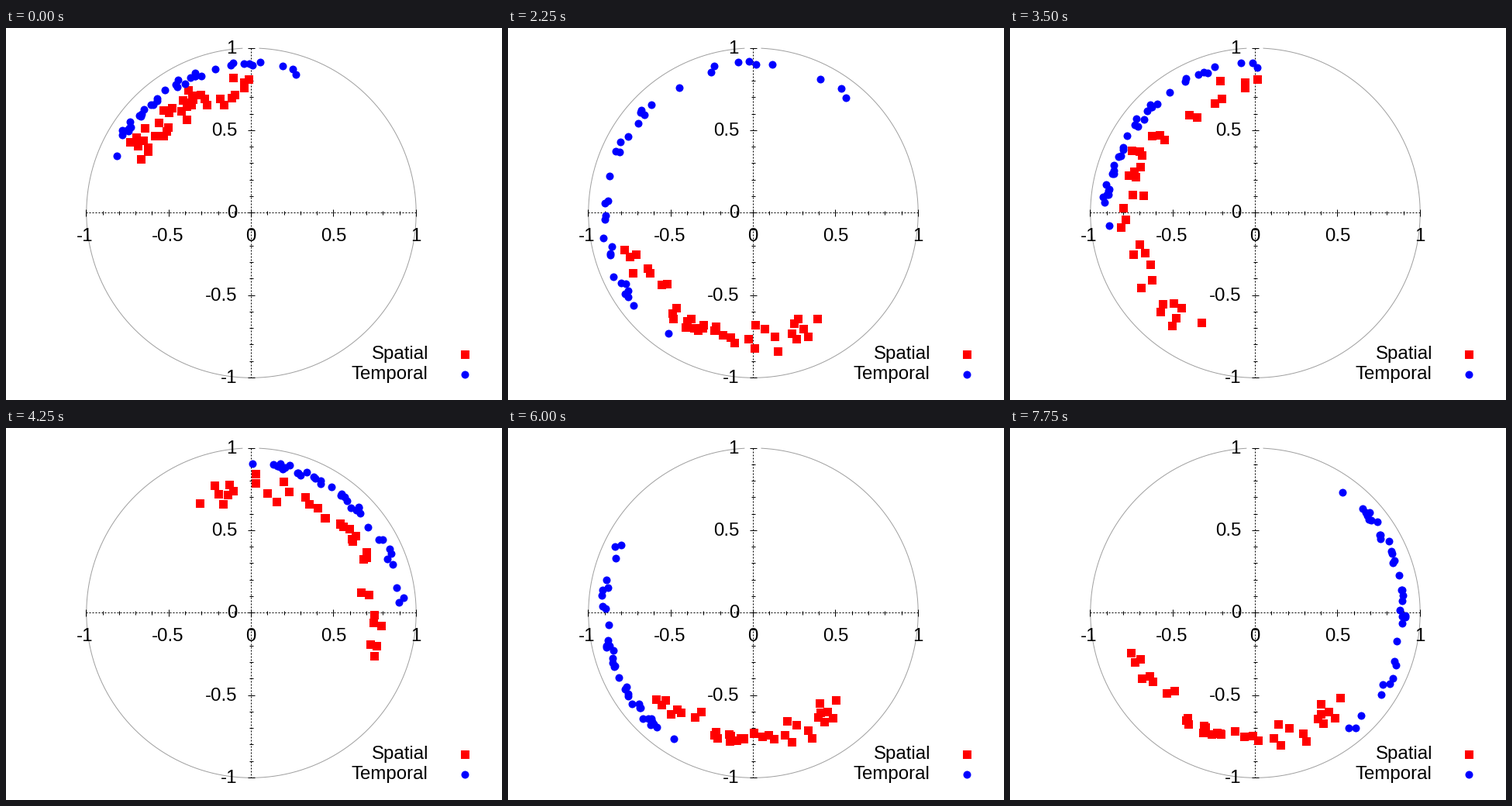
Write a matplotlib script that moves like this. It is 640 px wide and 480 px high and loops after 8000 ms.

```python
import numpy as np
import matplotlib.pyplot as plt
from matplotlib.animation import FuncAnimation

W, H, DPI = 640, 480, 100
PX = 72 / DPI                       # one pixel in points
CX, CY, R = 316.1, 238.3, 212.7
FRAMES, STEP_MS = 32, 250
COUNT = 36

# Each swarm is an arc that turns and stretches: its first and last angle
# (degrees, unwrapped) at a few key steps.
KEY_STEPS = [0, 4, 9, 14, 20, 27, 31]
SPATIAL_HEAD = [154, 152, -59, -116, -374, -431, -405]
SPATIAL_TAIL = [91, 19, -164, -271, -488, -506, -522]
TEMPORAL_HEAD = [157, 298, 235, -175, -366, -569, -666]
TEMPORAL_TAIL = [72, 216, 51, -271, -441, -662, -771]


class Swarm:
    def __init__(self, head, tail, r_min, r_max, wobble, seed):
        rng = np.random.default_rng(seed)
        self.head, self.tail = head, tail
        place = rng.beta(1.5, 1.5, COUNT)
        self.place = (place - place.min()) / np.ptp(place)
        self.radius = rng.uniform(r_min, r_max, COUNT)
        self.phase = rng.uniform(0, 2 * np.pi, COUNT)
        self.wobble = wobble

    def at(self, step):
        head = np.interp(step, KEY_STEPS, self.head)
        tail = np.interp(step, KEY_STEPS, self.tail)
        angle = np.radians(head + (tail - head) * self.place)
        r = R * (self.radius + self.wobble * np.sin(self.phase + 0.9 * step))
        return CX + r * np.cos(angle), CY - r * np.sin(angle)


plt.rcParams["font.family"] = "Liberation Sans"
fig = plt.figure(figsize=(W / DPI, H / DPI), dpi=DPI, facecolor="white")
ax = fig.add_axes([0, 0, 1, 1])
ax.set_xlim(0, W)
ax.set_ylim(H, 0)
ax.axis("off")


def line(x, y, color="black", **kw):
    ax.plot(x, y, color=color, lw=PX, solid_capstyle="butt",
            dash_capstyle="butt", zorder=1, **kw)


def label(x, y, text, ha):
    ax.text(x, y, text, ha=ha, va="baseline", size=24 * PX, zorder=2)


def markers(x, y, shape, color, size, z):
    return ax.plot(x, y, shape, color=color, ms=size * PX, mew=0, zorder=z)[0]


# Unit circle, open for a few pixels at the top
arc = np.radians(np.linspace(93, 447.3, 721))
line(CX + 0.4 + R * np.cos(arc), CY + 0.3 - R * np.sin(arc), "#a0a0a0")

# Axes with minor and major ticks
line([CX - R, CX + R], [CY, CY], dashes=(2, 2))
line([CX, CX], [CY - R, CY + R], dashes=(2, 2))
for i in range(-10, 11):
    half = 4.5 if i % 5 == 0 else 2.5
    x, y = CX + R * i / 10, CY - R * i / 10
    line([x, x], [CY - half, CY + half])
    line([CX - half, CX + half], [y, y])
    if i % 5 == 0:
        text = f"{i / 10:g}"
        label(x - (1.5 if i < 0 else 0), 275, text, "center")
        label(298, y + 7, text, "right")

# Legend
label(545, 427.5, "Spatial", "right")
label(544.5, 453.5, "Temporal", "right")
markers([592], [421], "s", "red", 11, 3)
markers([592], [447], "o", "blue", 10, 4)

swarms = [Swarm(SPATIAL_HEAD, SPATIAL_TAIL, 0.70, 0.83, 0.025, 5),
          Swarm(TEMPORAL_HEAD, TEMPORAL_TAIL, 0.885, 0.92, 0.01, 8)]
dots = [markers([], [], "s", "red", 11, 3),
        markers([], [], "o", "blue", 10, 4)]


def draw(step):
    for dot, swarm in zip(dots, swarms):
        dot.set_data(*swarm.at(step))
    return dots


anim = FuncAnimation(fig, draw, frames=FRAMES, interval=STEP_MS,
                     repeat=True, repeat_delay=0)
plt.show()
```
